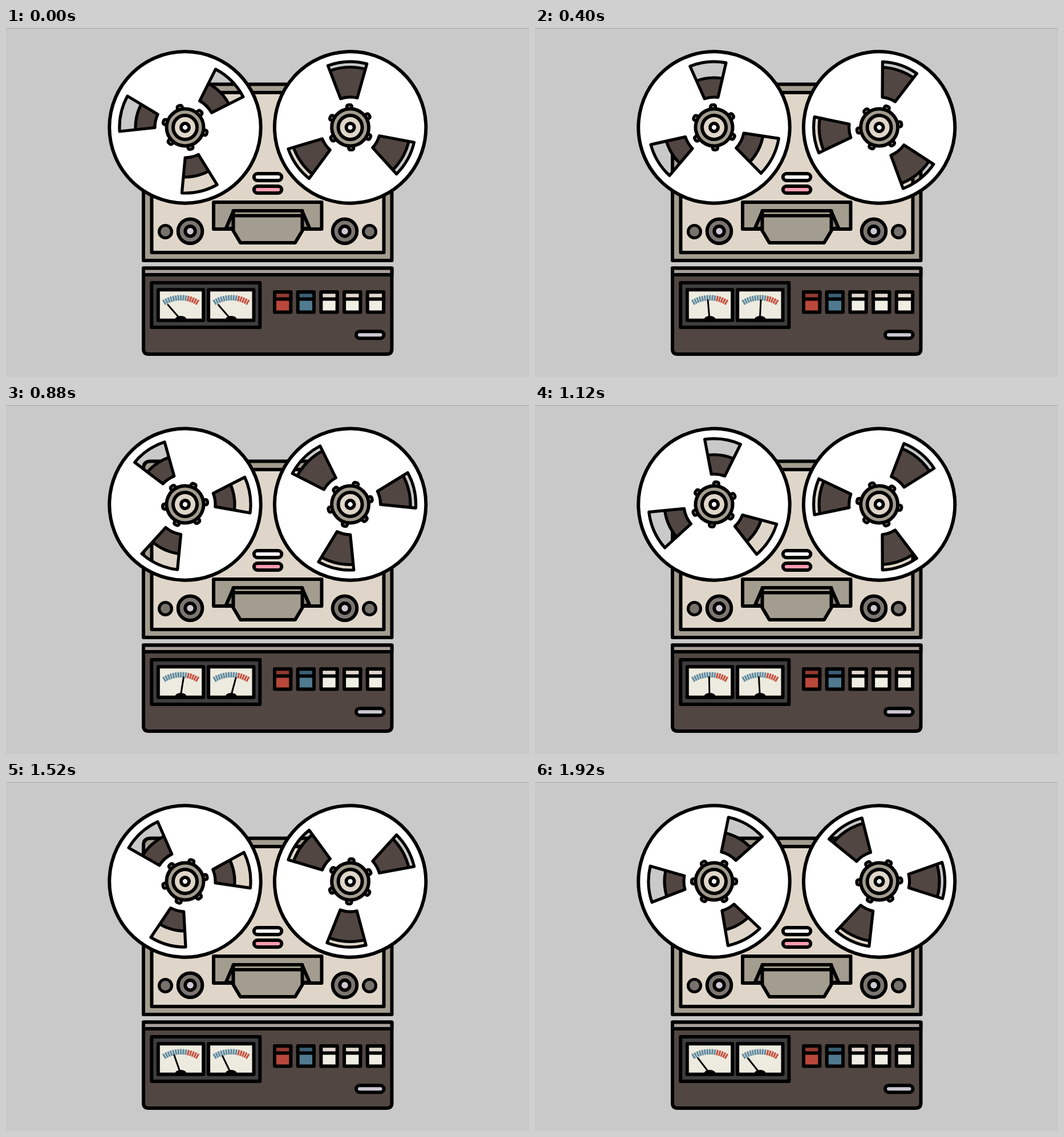
Recreate the animation shown at these times as an HTML page. Size 917 by 611 pixels, loop 2 s.

```html
<!DOCTYPE html>
<html lang="en">
<head>
<meta charset="utf-8">
<title>Tape deck</title>
<style>
  html, body { margin: 0; width: 100%; height: 100%; overflow: hidden; background: #c9c9c9; }
  svg { display: block; width: 917px; height: 611px; }
  .ink { stroke: #000; stroke-width: 6; stroke-linejoin: round; stroke-linecap: round; }
  .fine { stroke-width: 5.2; }
  .taupe { fill: #a39d90; }
  .beige { fill: #dfd6c9; }
  .brown { fill: #514642; }
  .white { fill: #fff; }
  .paper { fill: #edebdf; }
  .silver { fill: #cbc8d2; }
  .none { fill: none; }
</style>
</head>
<body>
<svg id="stage" viewBox="0 0 917 611">
  <rect width="917" height="611" fill="#c9c9c9"/>
  <rect width="917" height="1" fill="#a6a6a6"/>

  <!-- upper deck -->
  <path class="ink taupe" d="M241 407V111Q241 98.500 253.500 98.500H664Q676.500 98.500 676.500 111V407Z"/>
  <rect class="ink beige" x="255.500" y="113" width="407" height="280"/>
  <rect class="ink white" x="434.800" y="255" width="48.500" height="12" rx="6"/>
  <rect class="ink" fill="#fb9bb0" x="434.800" y="277" width="48.500" height="12" rx="6"/>

  <!-- tape head -->
  <rect class="ink taupe" x="364" y="305" width="189.500" height="47"/>
  <path class="ink" fill="#8d877b" d="M385.500 351L399 320H519L532.500 351Z"/>
  <path class="ink" fill="#b5b29d" d="M398.500 320H519.500V335H398.500Z"/>
  <path class="ink taupe" d="M398.500 328.500H519.500V355L507 376H411L398.500 355Z"/>

  <g id="knobs"></g>

  <!-- lower unit -->
  <path class="ink brown" d="M241 420.500H676.500V562Q676.500 571 667.500 571H250Q241 571 241 562Z"/>
  <path class="ink" fill="#a89f9b" d="M241 420.500H676.500V432H241Z"/>
  <rect class="ink" fill="#3e3e3e" x="255.300" y="446" width="190" height="78"/>
  <g id="meters"></g>
  <g id="buttons"></g>
  <rect class="ink silver" x="614" y="531.200" width="48.500" height="12" rx="6"/>

  <g id="reels"></g>
</svg>
<script>
const LOOP = 2000, STEP = 80, TICKS = 120;
const NS = 'http://www.w3.org/2000/svg';
const $ = id => document.getElementById(id);

function add(parent, tag, attrs) {
  const el = document.createElementNS(NS, tag);
  for (const key in attrs) el.setAttribute(key, attrs[key]);
  return parent.appendChild(el);
}
const circle = (parent, r, cls, extra) =>
  add(parent, 'circle', { r, class: 'ink ' + cls, ...extra });

// point at radius r, degrees clockwise from the top
function polar(r, deg) {
  const a = deg * Math.PI / 180;
  return (r * Math.sin(a)).toFixed(2) + ' ' + (-r * Math.cos(a)).toFixed(2);
}

function slot(mid, outerHalf, innerHalf) {
  const R = 115, r = 53;
  return `M${polar(R, mid - outerHalf)}A${R} ${R} 0 0 1 ${polar(R, mid + outerHalf)}` +
    `L${polar(r, mid + innerHalf)}A${r} ${r} 0 0 0 ${polar(r, mid - innerHalf)}Z`;
}

function makeReel(x, tapeRadius) {
  const reel = add($('reels'), 'g', { transform: `translate(${x} 174)` });
  circle(reel, tapeRadius, 'brown fine');
  const spin = add(reel, 'g', {});
  const R = 132.7;
  const slots = slot(0, 17.3, 16) + slot(121.8, 16, 13) + slot(237.5, 16, 13);
  add(spin, 'path', {
    class: 'white', 'fill-rule': 'evenodd',
    d: `M0 ${-R}A${R} ${R} 0 0 1 0 ${R}A${R} ${R} 0 0 1 0 ${-R}Z` + slots
  });
  add(spin, 'path', { class: 'ink fine none', d: slots });
  circle(spin, R, 'none');
  for (let a = 0; a < 360; a += 60) {
    add(spin, 'rect', {
      class: 'ink fine taupe', x: -4.5, y: -39.5, width: 9, height: 12, rx: 3,
      transform: `rotate(${a})`
    });
  }
  circle(spin, 32.5, 'taupe');
  circle(spin, 21, 'beige');
  circle(spin, 7, 'white');
  return spin;
}

function makeMeter(x) {
  const meter = add($('meters'), 'g', { transform: `translate(${x} 510)` });
  const box = { x: -39.2, y: -51.7, width: 79.4, height: 53.4 };
  add(meter, 'rect', { class: 'paper', ...box });
  for (let i = 0; i < 15; i++) {
    add(meter, 'path', {
      d: 'M0 -61.500V-52', stroke: i < 10 ? '#5f8aa0' : '#c4503f', 'stroke-width': 3.1,
      transform: `translate(0.6 19) rotate(${-30.5 + i * 61 / 14})`
    });
  }
  add(meter, 'path', { d: 'M-9.500 0A10 6 0 0 1 10.500 0Z' });
  const needle = add(meter, 'path', {
    d: 'M0 0V-33.500', stroke: '#000', 'stroke-width': 3, 'stroke-linecap': 'round'
  });
  add(meter, 'rect', { class: 'ink none', ...box });
  return needle;
}

for (const [small, big] of [[279.5, 323], [637.5, 594]]) {
  circle($('knobs'), 11, 'fine', { cx: small, cy: 356.5, fill: '#77726c' });
  circle($('knobs'), 21.3, '', { cx: big, cy: 355.7, fill: '#7b7671' });
  circle($('knobs'), 8.7, 'silver', { cx: big, cy: 355.7 });
}

const white = ['#e2d8d0', '#eeeee4'];
[['#943a31', '#b9483b'], ['#3a6076', '#4f7a8f'], white, white, white].forEach(([top, body], i) => {
  const x = 471 + i * 40.7;
  add($('buttons'), 'rect', { class: 'ink', x, y: 462.3, width: 28.3, height: 35.2, fill: body });
  add($('buttons'), 'rect', { class: 'ink', x, y: 462.3, width: 28.3, height: 12.2, fill: top });
});

const reels = [
  { el: makeReel(314, 87), start: 45, turns: 1 },
  { el: makeReel(603.6, 105.5), start: -2.6, turns: 2 }
];
// needle angles at each third of the loop
const needles = [
  { el: makeMeter(306), keys: [-41, 19, -11, -41] },
  { el: makeMeter(394.3), keys: [-41, 32, -20, -41] }
];

function swing(keys, p) {
  const pos = p * (keys.length - 1), i = Math.floor(pos);
  return keys[i] + (keys[i + 1] - keys[i]) * (pos - i);
}

function draw() {
  // the picture holds for one step, snapped to sixtieths of a second
  const held = Math.floor(performance.now() % LOOP / STEP) * STEP;
  const p = Math.round(held / LOOP * TICKS) / TICKS;
  for (const { el, start, turns } of reels) {
    el.setAttribute('transform', `rotate(${start + 360 * turns * p})`);
  }
  for (const { el, keys } of needles) {
    el.setAttribute('transform', `rotate(${swing(keys, p)})`);
  }
  requestAnimationFrame(draw);
}
draw();
</script>
</body>
</html>
```
